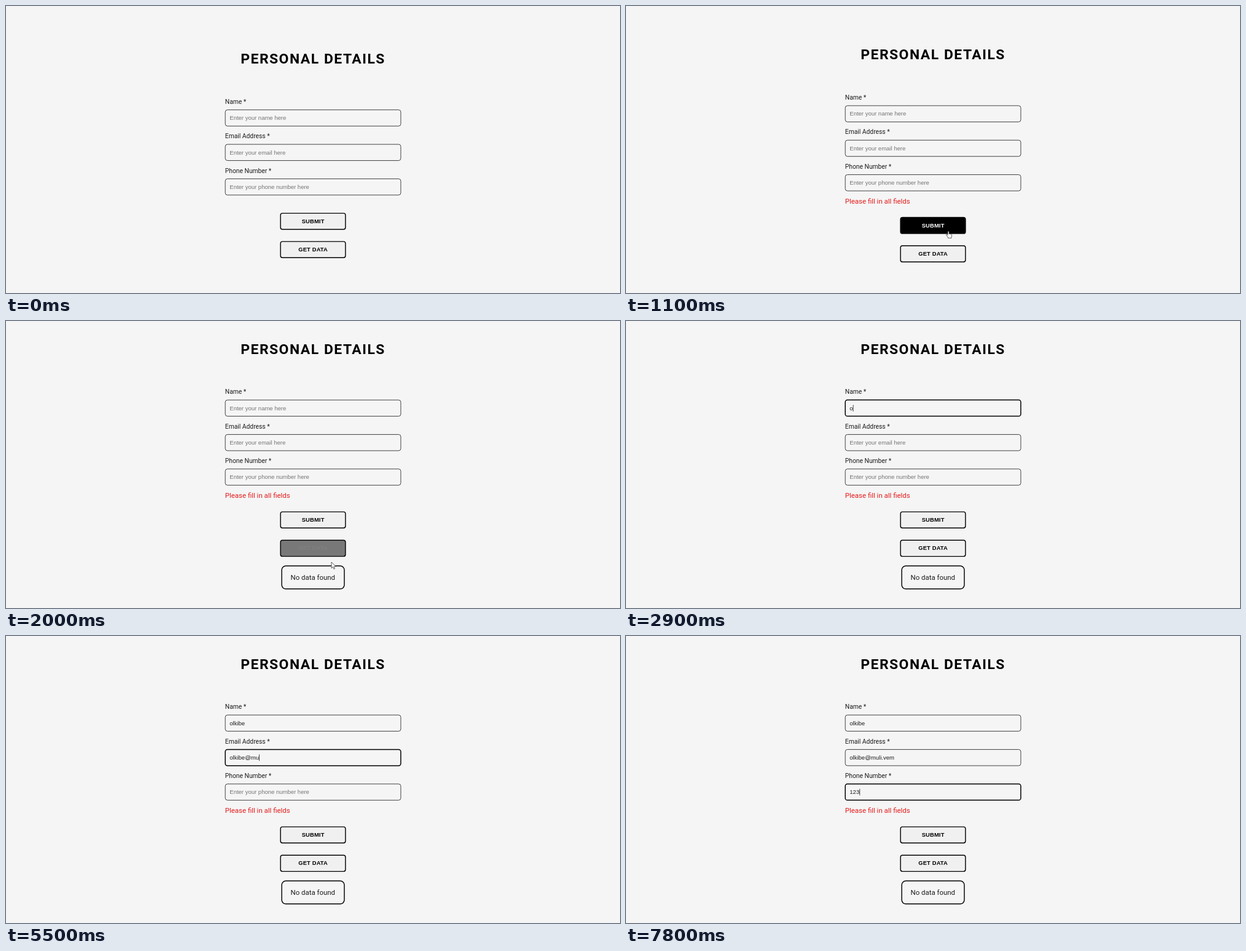
Recreate the animation shown at these times as an HTML page. Size 1000 by 469 pixels, loop 8 s.

```html
<!DOCTYPE html>
<html lang="en">
<head>
<meta charset="utf-8">
<title>Personal details form</title>
<style>
  html, body { margin: 0; width: 100%; height: 100%; overflow: hidden; background: #f5f5f5; }
  svg { display: block; width: 100vw; height: 100vh; }
  text { font: 10.3px Roboto, sans-serif; fill: #1c1c1c; white-space: pre; }
  .title { font-size: 22.9px; font-weight: 700; letter-spacing: 1.52px; fill: #000; }
  .box { fill: none; stroke: #222; stroke-width: .85; }
  .focus .box { stroke: #000; stroke-width: 1.5; }
  .value { font: 9.53px "Liberation Sans", Arial, sans-serif; }
  .empty .value { fill: #757575; }
  .caret { stroke: #111; stroke-width: .75; }
  .button text { font: 700 9.3px "Liberation Sans", Arial, sans-serif; letter-spacing: .2px; text-anchor: middle; }
  .button rect { stroke: #000; stroke-width: 1.43; }
  .note { font-size: 11.44px; }
  #error { fill: #e41b1b; }
  #hint rect { fill: #d5e5fb; }
  #hint .key { fill: none; stroke: #999; stroke-width: .7; }
  #hint .tab { font: 6px "Liberation Sans", Arial, sans-serif; fill: #888; }
  #pointer path { fill: #fff; stroke: #222; stroke-width: .7; stroke-linejoin: round; }
</style>
</head>
<body>
<svg viewBox="0 0 1000 469">
  <g id="head">
    <text class="title" x="382.2" y="94.2">PERSONAL DETAILS</text>
  </g>
  <g id="foot">
    <text id="error" class="note" x="356.8" y="316.1">Please fill in all fields</text>
    <g id="result">
      <rect x="449.1" y="427" width="101.9" height="37.5" rx="6.5" fill="none" stroke="#000" stroke-width="1.43"/>
      <text class="note" x="463.5" y="449.7">No data found</text>
    </g>
  </g>
  <g id="pointer"><path/></g>
</svg>
<script>
const LOOP = 8000;
const NAME = 'olkibe';
const MAIL = NAME + '@muli.vem';
const ROW = 56.35;
const $ = id => document.getElementById(id);

function add(parent, tag, attrs = {}, text = '') {
  const node = document.createElementNS('http://www.w3.org/2000/svg', tag);
  for (const key in attrs) node.setAttribute(key, attrs[key]);
  node.textContent = text;
  return parent.appendChild(node);
}

const show = (node, on) => node.setAttribute('visibility', on ? 'visible' : 'hidden');

// Last entry of a [time, ...values] track that has started.
const at = (track, t) => track.filter(entry => entry[0] <= t).pop();

// Each key is [time, number of characters typed].
const fields = [
  { label: 'Name *', prompt: 'Enter your name here', text: NAME, from: 2500, to: 4000,
    keys: [[0, 0], [2900, 1], [3100, 2], [3200, 3], [3300, 5], [3400, 6]] },
  { label: 'Email Address *', prompt: 'Enter your email here', text: MAIL, from: 4000, to: 7300,
    keys: [[0, 0], [4300, 1], [4400, 2], [4600, 4], [4700, 5], [4800, 6], [5100, 7], [5400, 8],
           [5500, 9], [6200, 10], [6700, 11], [6800, 12], [6900, 14], [7000, 15]] },
  { label: 'Phone Number *', prompt: 'Enter your phone number here', text: '123', from: 7300, to: LOOP,
    keys: [[0, 0], [7600, 1], [7700, 2], [7800, 3]] }
];

fields.forEach((field, i) => {
  const y = ROW * i;
  field.node = add($('head'), 'g');
  add(field.node, 'text', { x: 356.8, y: 159.8 + y }, field.label);
  add(field.node, 'rect', { class: 'box', x: 357.1, y: 169.7 + y, width: 285.9, height: 26.5, rx: 3.6 });
  field.value = add(field.node, 'text', { class: 'value', x: 364.3, y: 186.3 + y });
  field.caret = add(field.node, 'path', { class: 'caret', d: `M0 ${177.6 + y}v10.8` });
});

const hint = add($('head'), 'g', { id: 'hint' });
add(hint, 'rect', { x: 414.6, y: 234.2, width: 20.8, height: 10.4 });
add(hint, 'text', { class: 'value', x: 414.3, y: 186.3 + ROW }, '.vem');
add(hint, 'rect', { class: 'key', x: 437.8, y: 234.3, width: 14.8, height: 9.6, rx: 1.5 });
add(hint, 'text', { class: 'tab', x: 440.2, y: 241.3 }, 'Tab');

// Hover levels go from 0 (plain) to 1 (black).
const buttons = [
  { label: 'SUBMIT', y: 338.6, hover: [[0, 0], [700, .55], [800, 1], [1200, .5], [1300, 0]] },
  { label: 'GET DATA', y: 384.9,
    hover: [[0, 0], [1300, .4], [1400, 0], [1600, .5], [1700, 1], [2000, .5], [2100, 0]] }
];

for (const button of buttons) {
  const node = add($('foot'), 'g', { class: 'button' });
  button.rect = add(node, 'rect', { x: 447.1, y: button.y, width: 105.8, height: 26.4, rx: 3.2 });
  button.text = add(node, 'text', { x: 500.1, y: button.y + 16.2 }, button.label);
}

const grey = level => `rgb(${level},${level},${level})`;

// Time, offset of the fields, offset of the buttons.
const layout = [[0, 0, 0], [1000, -6.8, 6.9], [1900, -40.6, -26.7]];

const shapes = {
  arrow: 'M0 0V10L2.4 7.8L4 11.4L5.6 10.7L4 7.2H7.2Z',
  hand: 'M-.9 1A1 1 0 0 1 1.1 1V4.2L4.6 5Q5.8 5.4 5.6 6.8L5 9.6V11.2H-.4V10L-3.4 6.4Q-3.6 5-2.2 5.4L-.9 6.6Z',
  beam: 'M-1.5-5H1.5M0-5V5M-1.5 5H1.5'
};

const path = [
  [0, 0, 0, ''],
  [200, 622, 438, 'arrow'], [300, 616, 434, 'arrow'], [400, 605, 427, 'arrow'],
  [500, 590, 412, 'arrow'], [600, 566, 385, 'arrow'], [700, 538, 365, 'hand'],
  [800, 523.8, 363.6, 'hand'], [1100, 525, 368, 'hand'], [1200, 528, 378, 'arrow'],
  [1300, 532, 407, 'hand'], [1400, 535, 424, 'arrow'], [1600, 535, 413, 'hand'],
  [1700, 534.2, 406.6, 'hand'], [1900, 534.2, 406.6, 'arrow'], [2000, 530, 394, 'arrow'],
  [2100, 522, 343, 'arrow'], [2200, 510, 292, 'arrow'], [2300, 500, 254, 'beam'],
  [2500, 0, 0, '']
];

function drawField(field, t, hinted) {
  const typed = field.text.slice(0, at(field.keys, t)[1]);
  const focused = t >= field.from && t < field.to;
  field.node.setAttribute('class', (focused ? 'focus ' : '') + (typed ? '' : 'empty'));
  field.value.textContent = typed || field.prompt;
  show(field.caret, focused && !hinted);
  const width = typed ? field.value.getComputedTextLength() : 0;
  field.caret.setAttribute('transform', `translate(${364.8 + width})`);
}

function draw(t) {
  const [, headY, footY] = at(layout, t);
  $('head').setAttribute('transform', `translate(0 ${headY})`);
  $('foot').setAttribute('transform', `translate(0 ${footY})`);
  show($('error'), t >= 1000);
  show($('result'), t >= 1900);

  const hinted = t >= 6300 && t < 6500;
  show(hint, hinted);
  for (const field of fields) drawField(field, t, hinted);

  for (const button of buttons) {
    const level = at(button.hover, t)[1];
    button.rect.style.fill = grey(Math.round(240 * (1 - level)));
    button.text.style.fill = grey(Math.round(255 * level));
  }

  const [, x, y, shape] = at(path, t);
  show($('pointer'), shape);
  $('pointer').setAttribute('transform', `translate(${x} ${y})`);
  $('pointer').firstChild.setAttribute('d', shapes[shape] || '');
}

function tick() {
  draw(performance.now() % LOOP);
  requestAnimationFrame(tick);
}
tick();
</script>
</body>
</html>
```
